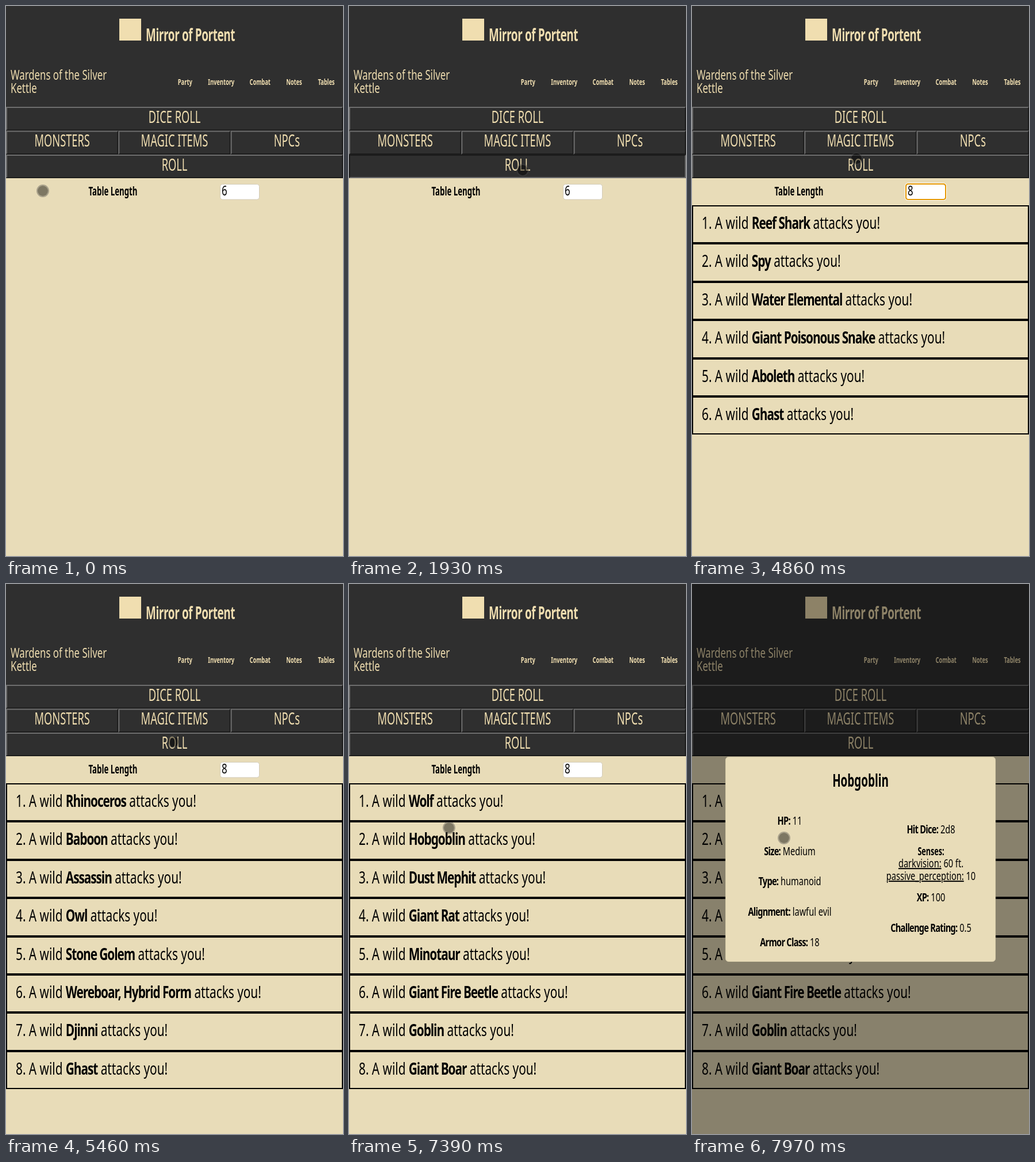
An HTML page for the animation above (7.99 s loop, 586 by 955 pixels).

```html
<!DOCTYPE html>
<html lang="en">
<head>
<meta charset="utf-8">
<title>Encounter tables</title>
<style>
html, body { margin: 0; width: 100%; height: 100%; overflow: hidden; background: #e8dcb8; }
svg { display: block; width: 100%; height: 100%; }
/* Condensed look: one proportion for regular type, one for bold and capitals. */
text {
  font-family: "Noto Sans", "Open Sans", sans-serif;
  white-space: pre;
  transform-box: fill-box;
  transform-origin: left;
  transform: scaleX(.73);
}
.cream { fill: #f0deb0; }
.mid { text-anchor: middle; transform-origin: center; }
.bold { font-weight: 700; }
text.bold, .button { transform: scaleX(.63); }
tspan.bold { letter-spacing: -.05em; }
.brand { font-size: 30px; letter-spacing: -.02em; }
.group { font-size: 23px; }
.nav { font-size: 15px; letter-spacing: -.01em; }
.button { font-size: 29px; }
.label { font-size: 21px; }
.row { font-size: 28.5px; }
.title { font-size: 30px; }
.stat { font-size: 20px; }
</style>
</head>
<body>
<svg id="stage" viewBox="0 0 586 955" preserveAspectRatio="none"></svg>
<script>
const LOOP = 7990;
const ROW_TOP = 346, ROW_H = 66.4;
const stage = document.getElementById('stage');

const text = (x, y, cls, body) => `<text x="${x}" y="${y}" class="${cls}">${body}</text>`;
const bold = s => `<tspan class="bold">${s}</tspan>`;
const rect = (x, y, w, h, attrs) => `<rect x="${x}" y="${y}" width="${w}" height="${h}" ${attrs}/>`;

// Bevelled button; the two edge paths swap colours when pressed.
function button(id, x, y, w, h, label) {
  const r = x + w, b = y + h;
  return `<g id="${id}">` + rect(x, y, w, h, 'fill="#2f2f2f"') +
    `<path class="lit" d="M${x} ${b}V${y}H${r}l-2 2H${x + 2}V${b - 2}z"/>` +
    `<path class="shade" d="M${r} ${y}V${b}H${x}l2 -2H${r - 2}V${y + 2}z"/>` +
    text(x + w / 2, y + 28, 'button cream mid', label) + '</g>';
}

function table(id, names) {
  const edge = i => Math.round(ROW_TOP + i * ROW_H);
  return `<g id="${id}">` + names.map((name, i) => {
    const y = edge(i);
    return rect(1, y + 1, 584, edge(i + 1) - y - 2, 'fill="none" stroke="#000" stroke-width="2"') +
      text(17, y + 41, 'row', `${i + 1}. A wild ${bold(name)} attacks you!`);
  }).join('') + '</g>';
}

const stat = (x, y, key, value) => text(x, y, 'stat mid', `${bold(key + ':')} ${value}`);
const sense = (y, key, value) =>
  text(415.5, y, 'stat mid', `<tspan text-decoration="underline">${key}:</tspan> ${value}`);

const nav = [['Party', 311], ['Inventory', 374], ['Combat', 441.5], ['Notes', 501], ['Tables', 557]];

stage.innerHTML =
  rect(0, 0, 586, 955, 'fill="#e8dcb8"') +
  rect(0, 0, 586, 299, 'fill="#2f2f2f"') +
  rect(197, 22, 38, 38, 'class="cream"') +
  text(243, 61, 'brand bold cream', 'Mirror of Portent') +
  text(8, 128, 'group cream', 'Wardens of the Silver') +
  text(8, 151, 'group cream', 'Kettle') +
  nav.map(([s, x]) => text(x, 137, 'nav bold cream mid', s)).join('') +
  button('dice', 0, 175, 586, 41.5, 'DICE ROLL') +
  button('monsters', 0, 216.5, 195.3, 41.5, 'MONSTERS') +
  button('items', 195.3, 216.5, 195.3, 41.5, 'MAGIC ITEMS') +
  button('npcs', 390.6, 216.5, 195.4, 41.5, 'NPCs') +
  button('roll', 0, 258, 586, 41, 'ROLL') +
  text(186, 329, 'label bold mid', 'Table Length') +
  rect(372.5, 309.5, 68, 26.5, 'rx="4" fill="#fff" stroke="#d2cbb8"') +
  '<g id="focus" fill="none">' +
    rect(370.5, 307.5, 72, 30, 'rx="5" stroke="#fff"') +
    rect(372, 309, 69, 27, 'rx="4" stroke="#e59700" stroke-width="2"') + '</g>' +
  text(375, 329, 'group', '<tspan id="count"></tspan>') +
  table('first', ['Reef Shark', 'Spy', 'Water Elemental', 'Giant Poisonous Snake', 'Aboleth', 'Ghast']) +
  table('second', ['Rhinoceros', 'Baboon', 'Assassin', 'Owl', 'Stone Golem',
    'Wereboar, Hybrid Form', 'Djinni', 'Ghast']) +
  table('third', ['Wolf', 'Hobgoblin', 'Dust Mephit', 'Giant Rat', 'Minotaur',
    'Giant Fire Beetle', 'Goblin', 'Giant Boar']) +
  rect(0, 0, 586, 955, 'id="dim"') +
  '<g id="modal">' +
    rect(58.5, 300.5, 469, 355, 'rx="5" fill="#e8dcb8" stroke="#d6cba9"') +
    text(293, 352, 'title bold mid', 'Hobgoblin') +
    stat(170, 418, 'HP', '11') +
    stat(170, 471, 'Size', 'Medium') +
    stat(170, 523.5, 'Type', 'humanoid') +
    stat(170, 576, 'Alignment', 'lawful evil') +
    stat(170, 629, 'Armor Class', '18') +
    stat(415.5, 433.5, 'Hit Dice', '2d8') +
    text(415.5, 471, 'stat bold mid', 'Senses:') +
    sense(492, 'darkvision', '60 ft.') +
    sense(514, 'passive_perception', '10') +
    stat(415.5, 551, 'XP', '100') +
    stat(415.5, 604, 'Challenge Rating', '0.5') + '</g>' +
  '<g id="pointer"><circle r="10" fill="none" stroke="#444" stroke-opacity=".38" stroke-width="2"/>' +
    '<circle r="9" fill="#000" fill-opacity=".46"/></g>';

const el = {};
stage.querySelectorAll('[id]').forEach(n => el[n.id] = n);

// Pointer stops: time, x, y.
const path = [
  [40, 64, 321], [260, 87, 242],
  [1180, 87, 242], [1280, 103, 237], [1640, 296, 302], [1800, 302, 285],
  [2270, 302, 285], [2360, 316, 280], [2680, 421, 330],
  [2830, 421, 330], [3000, 407, 323],
  [4520, 407, 323], [4820, 286, 265], [4900, 286, 265], [5060, 291, 274],
  [7000, 291, 274], [7490, 160, 441]
];

function pointerAt(t) {
  const i = path.findIndex(p => p[0] > t);
  if (i === 0) return path[0].slice(1);
  if (i < 0) return path[path.length - 1].slice(1);
  const a = path[i - 1], b = path[i];
  const u = (t - a[0]) / (b[0] - a[0]), e = u * u * (3 - 2 * u);
  return [a[1] + (b[1] - a[1]) * e, a[2] + (b[2] - a[2]) * e];
}

const within = (t, a, b) => t >= a && t < b;
const show = (node, on) => node.setAttribute('visibility', on ? 'visible' : 'hidden');

function press(node, down) {
  node.querySelector('.lit').setAttribute('fill', down ? '#1c1c1c' : '#6e6e6e');
  node.querySelector('.shade').setAttribute('fill', down ? '#6e6e6e' : '#1c1c1c');
}

function draw(t) {
  press(el.dice, false);
  press(el.items, false);
  press(el.npcs, false);
  press(el.monsters, within(t, 420, 560));
  press(el.roll, within(t, 1920, 2030) || within(t, 5230, 5360) || within(t, 6310, 6440));

  show(el.first, within(t, 2060, 5420));
  show(el.second, within(t, 5420, 6500));
  show(el.third, t >= 6500);

  show(el.focus, within(t, 3260, 5230));
  el.count.textContent = t < 3620 ? '6' : t < 4250 ? '' : '8';

  const [x, y] = pointerAt(t);
  el.pointer.setAttribute('transform', `translate(${x} ${y})`);
  show(el.pointer, !within(t, 3620, 4520));

  show(el.modal, t >= 7860);
  el.dim.setAttribute('fill-opacity', Math.min(.5, Math.max(0, (t - 7864) * .00388)));
}

const start = performance.now();
function tick() {
  draw((performance.now() - start) % LOOP);
  requestAnimationFrame(tick);
}
tick();
</script>
</body>
</html>
```
